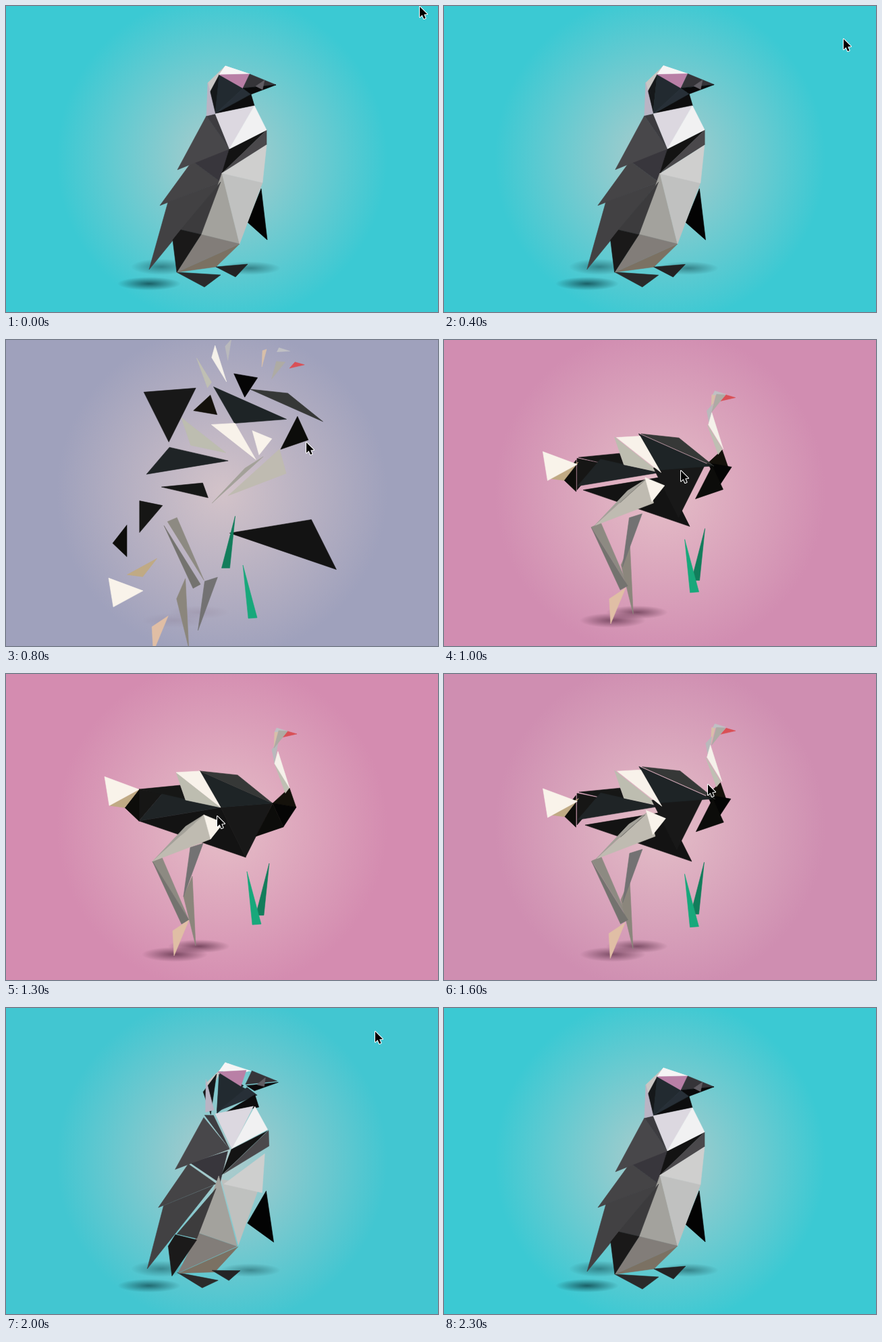
An HTML page with a canvas for the animation above (3.1 s loop, 640 px wide and 454 px high).

```html
<!DOCTYPE html>
<html lang="en">
<head>
<meta charset="utf-8">
<title>Penguin to ostrich</title>
<style>
html, body { margin: 0; width: 100%; height: 100%; overflow: hidden; background: #3bc9d3; }
canvas { display: block; width: 100vw; height: 100vh; }
</style>
</head>
<body>
<canvas id="stage" width="640" height="454"></canvas>
<script>
const ctx = document.getElementById('stage').getContext('2d');
const W = 640, H = 454, LOOP = 3100, STEP = 100;

const clamp = v => Math.min(1, Math.max(0, v));
const lerp = (a, b, k) => a + (b - a) * k;
const smooth = k => k * k * (3 - 2 * k);
const sigmoid = v => 1 / (1 + Math.exp(-v));
const rgb = hex => [1, 3, 5].map(i => parseInt(hex.slice(i, i + 2), 16));
const mix = (a, b, k) => `rgb(${a.map((v, i) => Math.round(lerp(v, b[i], k)))})`;

// Rises to 1 around `on`, falls back to 0 around `off` (ms).
const swing = (t, on, off) => sigmoid((t - on) / 62) * sigmoid((off - t) / 62);

// The two birds are meshes of shared corners.
const penguin = {
  crown: [325, 89], brow: [361, 101], temple: [316, 102], nape: [299, 114], jaw: [301, 130],
  cheek: [351, 122], chin: [363, 131], throat: [368, 148], neck: [310, 160], back: [297, 163],
  beak: [400, 117], lore: [370, 119], nare: [383, 110], lip: [380, 124],
  chest: [331, 212], breast: [386, 184], rib: [386, 206], waist: [320, 248], hip: [380, 262],
  side: [318, 261], vent: [346, 353], belly: [289, 339], rump: [259, 332], flank: [247, 347],
  seat: [253, 395], thigh: [311, 387], wing: [276, 230], wingTip: [254, 243],
  coat: [228, 296], elbow: [240, 291], tail: [212, 391],
  armpit: [378, 271], hand: [387, 347], arm: [358, 321],
  toe: [318, 399], sole: [294, 417], farToe: [358, 383], farSole: [340, 402]
};
const ostrich = {
  rump: [197, 171], hip: [231, 178], vent: [197, 218], saddle: [318, 198], flank: [355, 272],
  croup: [258, 165], loin: [266, 187], stub: [176, 198], fan: [146, 152], fork: [153, 195],
  wing: [252, 146], ridge: [287, 144], mantle: [343, 150], shoulder: [395, 192],
  breast: [430, 198], crop: [411, 227], keel: [370, 241],
  collar: [420, 169], neck: [398, 133], gullet: [414, 177], throat: [403, 115], scruff: [394, 112],
  cheek: [403, 102], jaw: [397, 110], face: [398, 86], eye: [404, 84],
  crown: [401, 80], brow: [417, 85], beak: [431, 89], lip: [409, 94],
  thigh: [293, 209], knee: [217, 278], calf: [266, 226], haunch: [303, 245], point: [322, 221],
  shin: [231, 272], ankle: [271, 365], heel: [260, 371], toe: [249, 418], instep: [247, 381],
  groin: [292, 251], ham: [273, 257], hock: [263, 330], leg: [276, 300], foot: [281, 403],
  reed: [390, 281], reedR: [382, 358], reedL: [370, 358],
  blade: [357, 293], bladeR: [378, 371], bladeL: [365, 372]
};

// A shard joins a penguin facet to an ostrich facet; (dx, dy) is how far it flies between.
const shards = [];
const corners = (mesh, names) => names.split(' ').map(n => mesh[n]);
const shard = (c0, from, c1, to, dx, dy) => shards.push({
  c0: rgb(c0), from: corners(penguin, from),
  c1: rgb(c1), to: corners(ostrich, to), d: [dx, dy]
});

// body and wings
shard('#030303', 'armpit hand arm', '#131313', 'saddle flank vent', 157, 80);
shard('#454446', 'wing side coat', '#161615', 'rump hip vent', 1, 79);
shard('#38363c', 'wing chest side', '#161716', 'rump croup loin', 39, 55);
shard('#424143', 'elbow side tail', '#0d0d0a', 'stub rump vent', -21, 121);
shard('#48474a', 'back chest wingTip', '#1f2426', 'hip saddle vent', 13, -22);
shard('#3d3c40', 'back chest neck', '#bdbdb0', 'wing saddle loin', 9, -36);

// head
shard('#c9c6c4', 'crown nape jaw', '#14110b', 'collar shoulder breast', -137, -102);
shard('#222a30', 'temple cheek neck', '#050505', 'shoulder breast crop', -67, -166);
shard('#15181a', 'temple jaw neck', '#181818', 'shoulder saddle flank', -133, -141);
shard('#222a30', 'temple cheek neck', '#1e2426', 'ridge shoulder saddle', 24, -87);
shard('#272f37', 'cheek chin neck', '#363837', 'mantle shoulder ridge', 87, -83);
shard('#0d0d0e', 'chin throat neck', '#0c0c0a', 'shoulder crop keel', 43, -92);

// belly, back and feet
shard('#a3a29d', 'waist vent belly', '#8d8a82', 'shin ankle knee', 26, -10);
shard('#2a2a2b', 'seat toe sole', '#8b867c', 'leg foot hock', -12, 63);
shard('#7b7163', 'vent thigh seat', '#737273', 'groin hock ham', 25, 118);
shard('#827d79', 'belly vent seat', '#74736f', 'knee ankle heel', 20, -3);
shard('#232324', 'thigh farToe farSole', '#e0bea5', 'ankle toe instep', -36, 52);
shard('#3c3b3d', 'side belly rump', '#c0aa84', 'rump stub fork', 31, 179);
shard('#1a1919', 'rump belly seat flank', '#f9f3ea', 'fan rump fork', 7, 235);

// breast
shard('#131313', 'breast chest waist', '#a3a199', 'thigh calf knee', 103, -42);
shard('#4a484b', 'breast rib waist', '#bfbbb1', 'thigh haunch knee', 131, -55);
shard('#dcd8e0', 'neck throat chest', '#f8f2ea', 'wing ridge saddle', 61, -24);
shard('#f1f1f2', 'throat breast chest', '#f9f3eb', 'thigh point haunch', 84, -87);
shard('#c0c1c0', 'hip vent waist', '#127d5b', 'reed reedR reedL', -59, -23);
shard('#cfcfce', 'rib hip waist', '#18a87b', 'blade bladeR bladeL', -7, 48);

// face and neck
shard('#b9b4c4', 'nape back neck', '#bfbfb3', 'neck gullet collar', -135, -124);
shard('#f6f5f5', 'crown brow temple', '#d8bfa9', 'face eye jaw', -21, -82);
shard('#f6f5f5', 'crown brow temple', '#b9b9bc', 'cheek neck scruff', -81, -120);
shard('#b97fa6', 'temple brow cheek', '#f5f1ea', 'neck throat collar', -109, -125);
shard('#353438', 'brow beak cheek', '#c0c0c4', 'crown brow face', 4, -80);
shard('#0a0a0b', 'cheek beak chin', '#d95056', 'lip beak brow', 13, -61);
shard('#605d63', 'lore nare lip', '#aeaba4', 'jaw eye brow', -4, -61);

function poly(points) {
  ctx.beginPath();
  points.forEach(p => ctx.lineTo(...p));
  ctx.closePath();
}

// Pose runs 0 = penguin, 1 = scattered, 2 = ostrich.
function drawShard(s, pose) {
  const points = s.from.map((p, i) => {
    const end = s.to[Math.min(i, s.to.length - 1)];
    return p.map((v, axis) => {
      const mid = end[axis] + s.d[axis];
      return pose < 1 ? lerp(v, mid, pose) : lerp(mid, end[axis], pose - 1);
    });
  });
  const k = clamp(pose);
  ctx.fillStyle = ctx.strokeStyle = mix(s.c0, s.c1, k * k);
  poly(points);
  ctx.lineWidth = .6;
  ctx.fill();
  ctx.stroke();
}

const teal = ['#b0cccc', '#3bc9d3'].map(rgb);
const pink = ['#e6bfc8', '#d48cb0'].map(rgb);

function drawBackground(k) {
  const g = ctx.createRadialGradient(320, 226, 0, 320, 226, 245);
  teal.forEach((c, i) => g.addColorStop(i, mix(c, pink[i], k)));
  ctx.fillStyle = g;
  ctx.fillRect(0, 0, W, H);
}

function shadow(x, y, rx, ry, color, alpha) {
  ctx.save();
  ctx.translate(x, y);
  ctx.scale(rx, ry);
  const g = ctx.createRadialGradient(0, 0, 0, 0, 0, 1);
  g.addColorStop(0, `rgba(${color},${alpha})`);
  g.addColorStop(.4, `rgba(${color},${alpha * .6})`);
  g.addColorStop(1, `rgba(${color},0)`);
  ctx.fillStyle = g;
  ctx.fillRect(-1, -1, 2, 2);
  ctx.restore();
}

function drawShadows(pose) {
  const a = clamp(1 - pose * 1.5), b = clamp(pose - 1);
  shadow(212, 412, 47, 10, '10,60,66', .75 * a);
  shadow(230, 387, 45, 12, '10,60,66', .5 * a);
  shadow(362, 389, 45, 10, '10,60,66', .5 * a);
  shadow(250, 416, 49, 11, '70,30,52', .65 * b);
  shadow(286, 404, 46, 10, '70,30,52', .65 * b);
}

function cursorAt(t) {
  if (t < 1300) {
    const k = smooth(clamp(t / 1200));
    return [lerp(613, 307, k ** 2), lerp(1, 211, k ** 1.1)];
  }
  const r = Math.max(0, t - 1400) / 200;
  return [313 + 78 * r, 211 - 47 * r ** 1.2];
}

function drawCursor(x, y) {
  ctx.save();
  ctx.translate(Math.round(x), Math.round(y));
  poly([[0, 0], [0, 15.5], [3.6, 12.2], [6.1, 18], [8.6, 17], [6.2, 11.4], [11, 11]]);
  ctx.lineWidth = 2;
  ctx.lineJoin = 'round';
  ctx.strokeStyle = '#fff';
  ctx.stroke();
  ctx.fillStyle = '#000';
  ctx.fill();
  ctx.restore();
}

function draw(now) {
  const t = Math.floor(now % LOOP / STEP) * STEP;
  const pose = 2 * swing(t, 782, 1800);
  drawBackground(swing(t, 760, 1810));
  drawShadows(pose);
  shards.forEach(s => drawShard(s, pose));
  drawCursor(...cursorAt(t));
}

let start;
function tick(now) {
  start ??= now;
  draw(now - start);
  requestAnimationFrame(tick);
}
draw(0);
requestAnimationFrame(tick);
</script>
</body>
</html>
```
